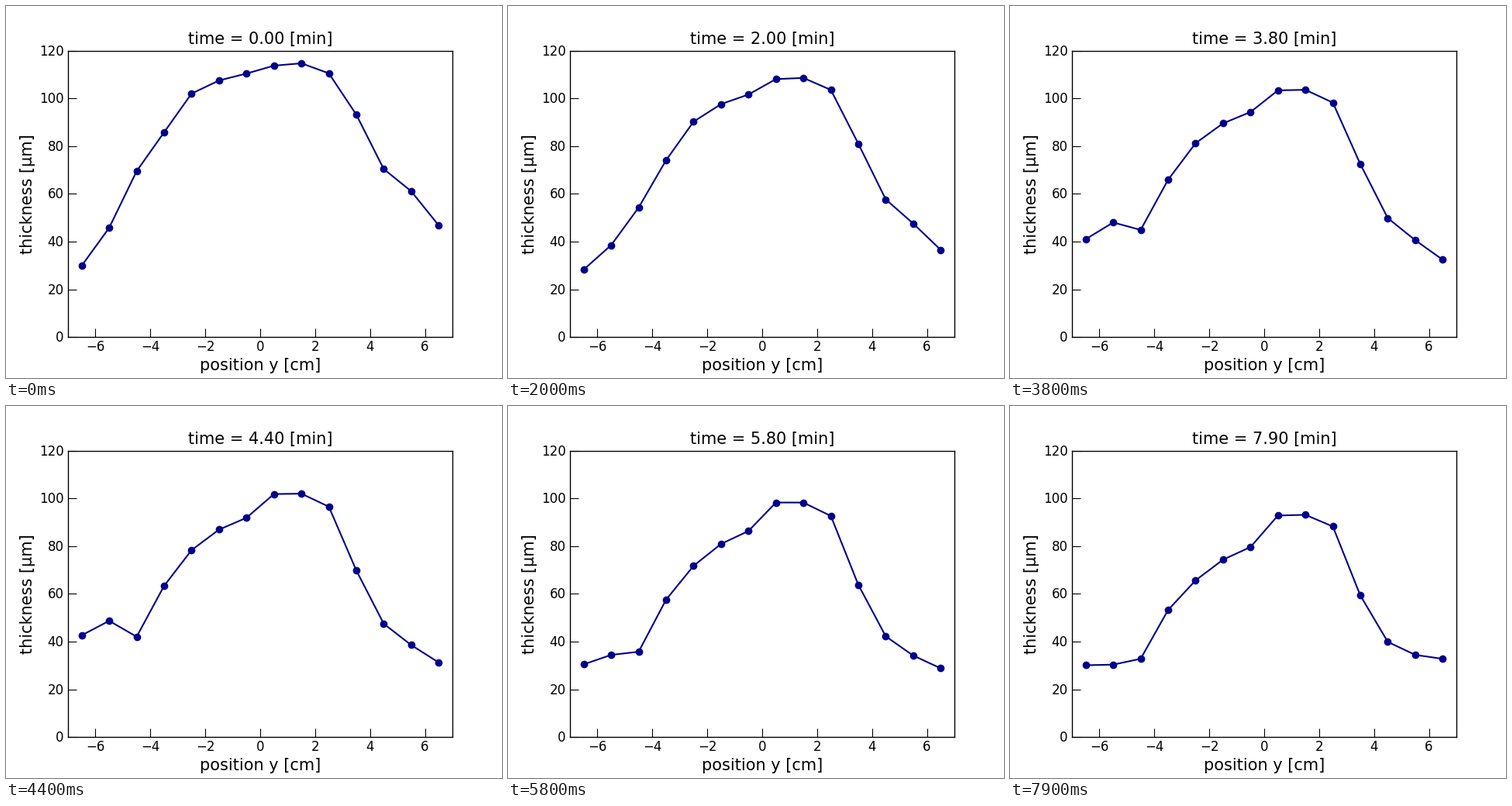
Animation of 640x480 px, one loop 8 s. Source, as a matplotlib script:

```python
import numpy as np
import matplotlib.pyplot as plt
from matplotlib.animation import FuncAnimation
from matplotlib.transforms import ScaledTranslation

plt.rcParams.update({"font.family": "DejaVu Sans", "text.kerning_factor": 6,
                     "axes.linewidth": 1.0})

FRAMES, STEP_MS = 80, 100
DRAINED = 6.7  # minutes until the film stops thinning

pos = np.arange(-6.5, 7)
full = np.array([29.9, 45.8, 69.5, 85.8, 102, 107.5, 110.4,
                 113.7, 114.7, 110.5, 93.2, 70.4, 61.1, 46.8])
thin = np.array([24.7, 27.4, 31.9, 54, 67.6, 77.1, 82.8,
                 96, 95.9, 90.2, 60.1, 39, 31.5, 27.4])


def thickness(t):
    # The film drains sooner towards its edges
    drain = min(t / DRAINED, 1) ** (0.95 - 0.01 * pos**2)
    # A wave passes the left edge
    wave = 17 * np.exp(-((t - 4.3) / 1.4) ** 2) * (pos < -5)
    # Later the middle flows back out to the edges
    refill = max(t - DRAINED, 0) * (0.17 * pos**2 - 2.7)
    return full + (thin - full) * drain + wave + refill


fig = plt.figure(figsize=(6.4, 4.8), dpi=100, facecolor="white")
ax = fig.add_axes([0.125, 0.11, 0.775, 0.77])
ax.set(xlim=(-7, 7), ylim=(0, 120),
       xticks=range(-6, 7, 2), yticks=range(0, 121, 20))
ax.tick_params(direction="in", length=8, width=0.8, labelsize=12)
ax.tick_params(axis="x", pad=2.8)
ax.tick_params(axis="y", pad=4)
ax.set_xlabel("position y [cm]", fontsize=15, labelpad=3.4)
ax.set_ylabel("thickness [µm]", fontsize=15, labelpad=3.5)

# Centre the tick numbers on their ticks
lift = ScaledTranslation(0, 0.01, fig.dpi_scale_trans)
for label in ax.get_yticklabels():
    label.set_transform(label.get_transform() + lift)

title = ax.set_title("", fontsize=15)
line, = ax.plot(pos, thickness(0), "o-", color="darkblue", lw=1.5, ms=6)


def draw(n):
    t = n * STEP_MS / 1000
    line.set_ydata(thickness(t))
    title.set_text(f"time = {t:.2f} [min]")
    return line, title


anim = FuncAnimation(fig, draw, frames=FRAMES, interval=STEP_MS,
                     repeat=True, repeat_delay=0)
plt.show()
```
